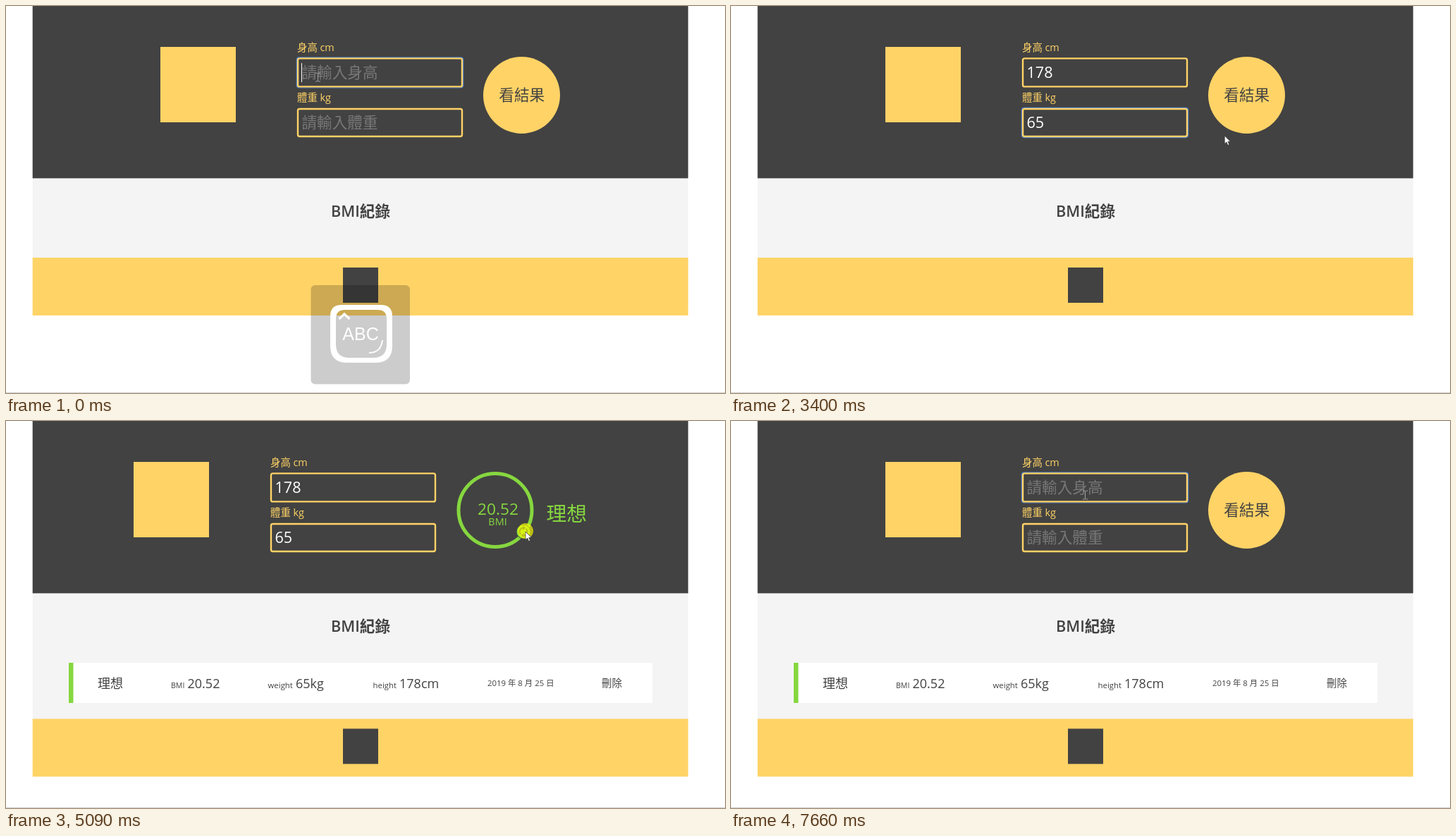
Write an HTML page that moves like this. It is 1020 px wide and 549 px high and loops after 8 s.

```html
<!DOCTYPE html>
<html lang="zh-Hant">
<head>
<meta charset="utf-8">
<title>BMI</title>
<style>
  html, body { margin: 0; width: 100%; height: 100%; overflow: hidden; background: #fff; }
  svg { display: block; width: 1020px; height: 549px; }
  text { font-family: "Open Sans", "Noto Sans CJK TC", "Noto Sans CJK", "Noto Sans", sans-serif; white-space: pre; }
  .label { font-size: 14.4px; fill: #ffd366; }
  .value { font-size: 21.6px; }
  .dark { fill: #424242; }
  .green { fill: #86d73f; }
  .tiny { font-size: 10.6px; }
  .small { font-size: 11.4px; }
  .big { font-size: 18px; }
  .field { fill: none; stroke: #ffd366; stroke-width: 2.4; }
  .ring { fill: none; stroke: #4a80d8; stroke-width: 1.2; }
  .glow { filter: drop-shadow(0 0 3px #ffd366) drop-shadow(0 0 2px #ffd366); }
</style>
</head>
<body>
<svg viewBox="0 0 1020 549" width="1020" height="549">
  <rect width="1020" height="549" fill="#fff"/>
  <rect y="548" width="1020" height="1" fill="#d2d2d2"/>
  <rect x="37.700" y="244" width="930" height="180" fill="#f4f4f4"/>
  <rect x="37.700" width="930" height="244.400" class="dark"/>

  <g id="form">
    <rect x="219" y="58" width="107" height="107" fill="#ffd366"/>
    <text class="label" x="413" y="64">身高 cm</text>
    <text class="label" x="413" y="135">體重 kg</text>
    <rect class="ring" id="ringH" x="412.4" y="72.800" width="236.2" height="43.2" rx="3.5"/>
    <rect class="ring" id="ringW" x="412.4" y="144.4" width="236.2" height="42.2" rx="3.5"/>
    <rect class="field" x="414" y="74.4" width="233" height="40" rx="2.5"/>
    <rect class="field" x="414" y="146" width="233" height="39" rx="2.5"/>
    <text class="value" id="height" x="419.5" y="102"></text>
    <text class="value" id="weight" x="419.5" y="173"></text>
    <rect id="caret" width="1" height="27" fill="#fff"/>
  </g>

  <g id="button">
    <circle id="disc" cx="731.5" cy="126.5" r="54.5" fill="#ffd366"/>
    <rect class="ring" id="ringB" x="676.8" y="71.8" width="109.4" height="109.4"/>
    <text class="value dark" x="731.7" y="134" text-anchor="middle">看結果</text>
  </g>

  <g id="result" class="green">
    <circle cx="694" cy="126.5" r="52" fill="none" stroke="#86d73f" stroke-width="5"/>
    <text x="698" y="133" font-size="22.7" text-anchor="middle">20.52</text>
    <text x="697.5" y="148" font-size="14.4" text-anchor="middle">BMI</text>
    <circle cx="734" cy="157" r="10" stroke="#424242"/>
    <g fill="none" stroke="#424242" stroke-width="1.8">
      <path d="M730.2 160.8A5.3 5.3 0 0 1 734 151.7M737.8 153.2A5.3 5.3 0 0 1 734 162.3"/>
      <path d="M733.4 148.6l3.6 3.1l-3.6 3.1zM734.6 159.2l-3.6 3.1l3.6 3.1z" fill="#424242" stroke="none"/>
    </g>
    <text x="766.5" y="142" font-size="28.8">理想</text>
  </g>

  <text class="value dark" x="503" y="299" font-weight="600" text-anchor="middle">BMI紀錄</text>

  <g id="row" class="dark">
    <rect x="89" y="343" width="828" height="57" fill="#fff"/>
    <rect x="89" y="343" width="6.5" height="57" class="green"/>
    <text class="big" x="130" y="378.5">理想</text>
    <text class="tiny" x="234" y="379">BMI</text>
    <text class="big" x="257.5" y="379">20.52</text>
    <text class="small" x="371.5" y="379">weight</text>
    <text class="big" x="411" y="379">65kg</text>
    <text class="small" x="520.5" y="379">height</text>
    <text class="big" x="558" y="379">178cm</text>
    <text class="small" x="683" y="376">2019 年 8 月 25 日</text>
    <text x="845" y="376.5" font-size="14.4">刪除</text>
  </g>

  <g id="footer">
    <rect x="37.700" y="357" width="930" height="82" fill="#ffd366"/>
    <rect x="478" y="371" width="50" height="50" class="dark"/>
  </g>

  <g id="ime">
    <rect x="432.5" y="396" width="140.5" height="140.5" rx="6" fill="#000" fill-opacity=".2"/>
    <path fill="#fff" fill-rule="evenodd" d="M476 424h56q16 0 16 16v42q0 24-24 24h-40q-24 0-24-24v-42q0-16 16-16zM481 431q-13 0-13 13v36q0 19 19 19h34q19 0 19-19v-36q0-13-13-13z"/>
    <path d="M472.5 444l7.5-7l7.5 7" fill="none" stroke="#fff" stroke-width="3.2"/>
    <path d="M515 492q17 0 19-18" fill="none" stroke="#fff" stroke-width="2"/>
    <text x="503" y="473.5" fill="#fff" text-anchor="middle" style="font:25px 'Liberation Sans',Arial,sans-serif">ABC</text>
  </g>

  <circle id="flash" r="11" fill="#ff0" fill-opacity=".65"/>
  <path id="beam" d="M-3.5-6h2.5l1 1l1-1h2.5M0-5v10M-3.5 6h2.5l1-1l1 1h2.5" fill="none" stroke="#a4a4a4"/>
  <path id="arrow" d="M0 0V11.5L2.7 9L4.6 13.4L6.6 12.5L4.7 8.3H8.3Z" fill="#fff" stroke="#333" stroke-width=".7"/>
</svg>
<script>
const LOOP = 8000, TICK = 77.15;
const el = {};
document.querySelectorAll('[id]').forEach(e => el[e.id] = e);

// pointer path: time, x, y
const path = [
  [1235, 442.5, 101], [1620, 450.5, 181], [2940, 450.5, 181],
  [3390, 700, 184], [3550, 790, 182], [3710, 766.5, 161], [4550, 766.5, 161],
  [4940, 737, 157], [5320, 737, 157], [5560, 585.5, 154], [5950, 502.5, 105]
];
const caretOn = [[0, 930], [1430, 3090], [3550, 3770], [6100, 6650], [7120, 7660]];
const clicks = [[1780, 1930], [3770, 3930], [5090, 5250], [6100, 6190]];

const within = (t, spans) => spans.some(([a, b]) => t >= a && t < b);
const show = (e, on) => e.setAttribute('display', on ? 'inline' : 'none');
const move = (e, x, y) => e.setAttribute('transform', `translate(${x} ${y})`);

function pointer(t) {
  const s = Math.floor((t + 10) / TICK) * TICK;
  const i = path.findIndex(p => p[0] > s);
  if (i === 0) return path[0].slice(1);
  if (i < 0) return path[path.length - 1].slice(1);
  const [a, ax, ay] = path[i - 1], [b, bx, by] = path[i];
  const u = (s - a) / (b - a), k = u * u * (3 - 2 * u);
  return [ax + (bx - ax) * k, ay + (by - ay) * k];
}

function typed(t, keys, text) {
  return t >= 5170 ? '' : text.slice(0, keys.filter(k => t >= k).length);
}

function fill(e, value, hint) {
  e.textContent = value || hint;
  e.setAttribute('fill', value ? '#fff' : '#777');
}

function draw(t) {
  const done = t >= 3930 && t < 5170, logged = t >= 3930;
  const height = typed(t, [70, 300, 380], '178');
  const weight = typed(t, [2250, 2560], '65');
  fill(el.height, height, '請輸入身高');
  fill(el.weight, weight, '請輸入體重');

  const onH = t < 1780 || t >= 6100, onW = t >= 1780 && t < 3770;
  show(el.ringH, onH);
  show(el.ringW, onW);
  show(el.ringB, t >= 3770 && t < 3930);
  show(el.caret, within(t, caretOn));
  el.caret.setAttribute('x', 419 + 12 * (onW ? weight : height).length);
  el.caret.setAttribute('y', onW ? 151.5 : 81);

  move(el.form, done ? -38 : 0, 0);
  show(el.button, !done);
  show(el.result, done);
  show(el.row, logged);
  move(el.footer, 0, logged ? 65.5 : 0);

  const fade = Math.min(1, Math.max(0, (2400 - t) / 860));
  el.ime.setAttribute('opacity', fade);
  show(el.ime, fade > 0);

  const [x, y] = pointer(t);
  const text = x > 413 && x < 648 && y > 73 && y < 186;
  show(el.beam, text);
  show(el.arrow, !text);
  [el.beam, el.arrow].forEach(e => move(e, x, y));
  move(el.flash, x, y - 1);
  show(el.flash, within(t, clicks));
  el.disc.setAttribute('class', Math.hypot(x - 731.5, y - 126.5) < 54.5 ? 'glow' : '');
}

function loop() {
  draw(performance.now() % LOOP);
  requestAnimationFrame(loop);
}
loop();
</script>
</body>
</html>
```
